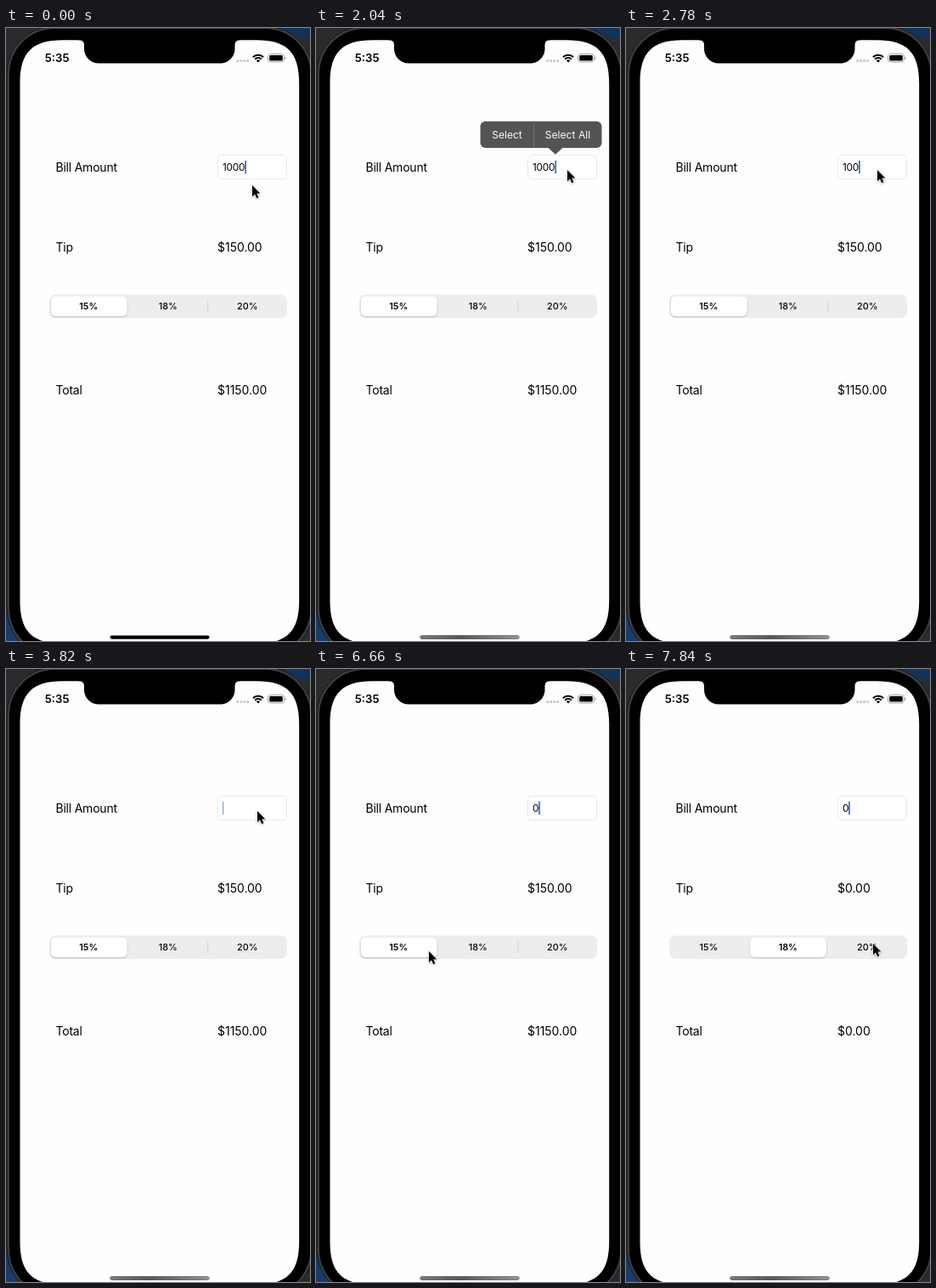
Recreate the animation shown at these times as an HTML page. Size 358 by 721 pixels, loop 7990 ms.

```html
<!DOCTYPE html>
<html lang="en">
<head>
<meta charset="utf-8">
<title>Tip calculator</title>
<style>
  html, body { margin: 0; width: 100%; height: 100%; overflow: hidden; background: #2b2b2d; }
  svg { display: block; width: 358px; height: 721px; }
  text { font-family: Inter, Roboto, sans-serif; fill: #000; }
  .label { font-size: 14px; letter-spacing: -0.22px; }
  .amount { font-size: 14px; letter-spacing: -0.02px; }
  .field { font-size: 11.8px; letter-spacing: -0.15px; }
  .clock { font-size: 13.2px; font-weight: 600; }
  .seg { font-size: 10.8px; font-weight: 500; text-anchor: middle; }
  .menu { font-size: 12px; fill: #fff; text-anchor: middle; letter-spacing: 0.05px; }
  #thumb { filter: drop-shadow(0 1px 1.2px rgba(0, 0, 0, .2)); }
  #cursor { filter: drop-shadow(0 1px 1px rgba(0, 0, 0, .3)); }
</style>
</head>
<body>
<svg viewBox="0 0 358 721" xmlns="http://www.w3.org/2000/svg">
  <defs>
    <linearGradient id="dim">
      <stop offset="0" stop-color="#7a7a7a"/>
      <stop offset=".4" stop-color="#585858"/>
      <stop offset="1" stop-color="#929292"/>
    </linearGradient>
  </defs>

  <!-- desktop and phone body -->
  <rect width="358" height="721" fill="#2b2b2d"/>
  <rect x="318" width="40" height="12" fill="#123257"/>
  <rect y="688" width="40" height="33" fill="#173c6e"/>
  <rect x="1" y="-2" width="360.5" height="741" rx="56" fill="#3d3d3f" stroke="#161617"/>
  <rect x="4" y="1" width="354.5" height="735" rx="53"/>
  <path fill="#fefefe" d="M66.5 14.2H295.2c35.5 0 50 14.5 50 50V674c0 35.5-14.5 50-50 50H66.5c-35.5 0-50-14.5-50-50V64.2c0-35.5 14.5-50 50-50Z"/>
  <path d="M86 13V14.2Q92 14.2 92 20V24.5A17 17 0 0 0 109 41.5H252.5A17 17 0 0 0 269.5 24.5V20Q269.5 14.2 275.5 14.2V13Z"/>

  <!-- status bar -->
  <text class="clock" x="45.8" y="40">5:35</text>
  <path d="M272.8 38.6h12.1" stroke="#c8c8ca" stroke-width="3.2" stroke-linecap="round" stroke-dasharray="0 4"/>
  <g fill="none" stroke="#000" stroke-width="2">
    <path d="M290.9 34.2A8.6 8.6 0 0 1 303.1 34.2"/>
    <path d="M293.2 36.7A5.3 5.3 0 0 1 300.8 36.7"/>
  </g>
  <path d="M297 40.6L294.9 38.4A3 3 0 0 1 299.1 38.4Z"/>
  <rect x="308.6" y="30.6" width="18.8" height="9.4" rx="2.8" fill="none" stroke="#a0a0a0"/>
  <rect x="310.2" y="32.1" width="15.6" height="6.4" rx="1.5"/>
  <path d="M328.6 33.7Q330 34.2 330 35.3T328.6 36.9Z" fill="#a0a0a0"/>

  <!-- form -->
  <g class="label">
    <text x="58.5" y="169">Bill Amount</text>
    <text x="58.5" y="262.7">Tip</text>
    <text x="58.5" y="431.2">Total</text>
  </g>
  <text id="tip" class="amount" x="249" y="262.7"></text>
  <text id="total" class="amount" x="249" y="431.2"></text>
  <rect x="249.5" y="149.5" width="81" height="28.3" rx="4" fill="#fff" stroke="#e9e9ea"/>
  <text id="bill" class="field" x="254.9" y="168"></text>
  <rect id="caret" y="155.7" width="1.7" height="15.8" rx=".8" fill="#3d63dc"/>

  <rect x="51" y="313.5" width="280" height="27.5" rx="7" fill="#ededee"/>
  <rect id="divider" x="237.2" y="320" width="1" height="14" fill="#d4d4d6"/>
  <rect id="thumb" y="315.4" width="89.8" height="23.6" rx="5.6" fill="#fff"/>
  <g id="segments" class="seg">
    <text x="97.3" y="331.3">15%</text>
    <text x="190.8" y="331.3">18%</text>
    <text x="284.2" y="331.3">20%</text>
  </g>

  <!-- edit menu -->
  <g id="menu">
    <rect x="193.5" y="109.7" width="143" height="31.3" rx="6"/>
    <path d="M273 140.5H291L282 148.8Z"/>
    <rect x="256" y="109.7" width="1" height="31.3" fill="#2c2c2e"/>
    <text class="menu" x="225" y="129.6">Select</text>
    <text class="menu" x="296.5" y="129.6">Select All</text>
  </g>

  <!-- home indicator -->
  <rect x="122.5" y="714.5" width="117" height="4.2" rx="2.1"/>
  <rect id="home" x="122.5" y="714.5" width="117" height="4.2" rx="2.1" fill="url(#dim)"/>

  <path id="cursor" d="M0 0V15.6L3.6 12.3L6.1 18L8.7 16.9L6.2 11.3H11Z"
        stroke="#fff" stroke-width="1.3" stroke-linejoin="round" paint-order="stroke"/>
</svg>
<script>
const LOOP = 7990, STEP = 148, LEAD = 40;
const $ = id => document.getElementById(id);
const set = (id, name, value) => $(id).setAttribute(name, value);

const ramp = (n, from, to) => Math.min(1, Math.max(0, (n - from) / (to - from)));
const smooth = u => u * u * (3 - 2 * u);

// All times below count steps of STEP ms.
const edits = [
  { at: 0, text: "1000", blink: 1 },
  { at: 18, text: "1000", blink: 26 },
  { at: 19, text: "100", blink: 26 },
  { at: 21, text: "10", blink: 26 },
  { at: 22, text: "", blink: 26 },
  { at: 32, text: "0", blink: 35 }
];
const home = [290, 185];
const moves = [
  { from: 7, to: 11, end: [296, 167] },
  { from: 34, to: 36, end: [295, 173] },
  { from: 36, to: 38, end: [295, 199] },
  { from: 41, to: 45, end: [133, 332] },
  { from: 45, to: 48, end: [165, 332] },
  { from: 49, to: 53, end: [291, 323] }
];

// The caret fades out and back once every seven steps.
function caretAlpha(n, start) {
  return n < start ? 1 : Math.min(1, Math.abs((n - start) % 7 - 1) / 2);
}

function pointer(n) {
  return moves.reduce((pos, { from, to, end }) => {
    const u = smooth(ramp(n, from, to));
    return pos.map((p, i) => p + (end[i] - p) * u);
  }, home);
}

function draw(t) {
  const n = Math.floor((t + LEAD) / STEP);
  const edit = edits.findLast(e => e.at <= n);
  const slide = smooth(ramp(n, 46, 50));
  const bill = n < 48 ? 1000 : 0;
  const rate = n < 48 ? 0.15 : 0.18;
  const [x, y] = pointer(n);

  $("bill").textContent = edit.text;
  set("caret", "x", 254.8 + $("bill").getComputedTextLength());
  set("caret", "opacity", caretAlpha(n, edit.blink));
  $("tip").textContent = "$" + (bill * rate).toFixed(2);
  $("total").textContent = "$" + (bill * (1 + rate)).toFixed(2);
  set("menu", "opacity", ramp(n, 12, 15) - ramp(n, 17, 19));
  set("home", "opacity", ramp(n, 11, 13));
  set("thumb", "x", 52.8 + 93.3 * slide);
  set("divider", "opacity", 1 - slide);
  [...$("segments").children].forEach((label, i) => {
    label.style.fontWeight = i === (slide > .1 ? 1 : 0) ? 600 : 500;
  });
  set("cursor", "transform", `translate(${x} ${y}) scale(.85)`);
}

const start = performance.now();
function frame() {
  draw((performance.now() - start) % LOOP);
  requestAnimationFrame(frame);
}
frame();
</script>
</body>
</html>
```
